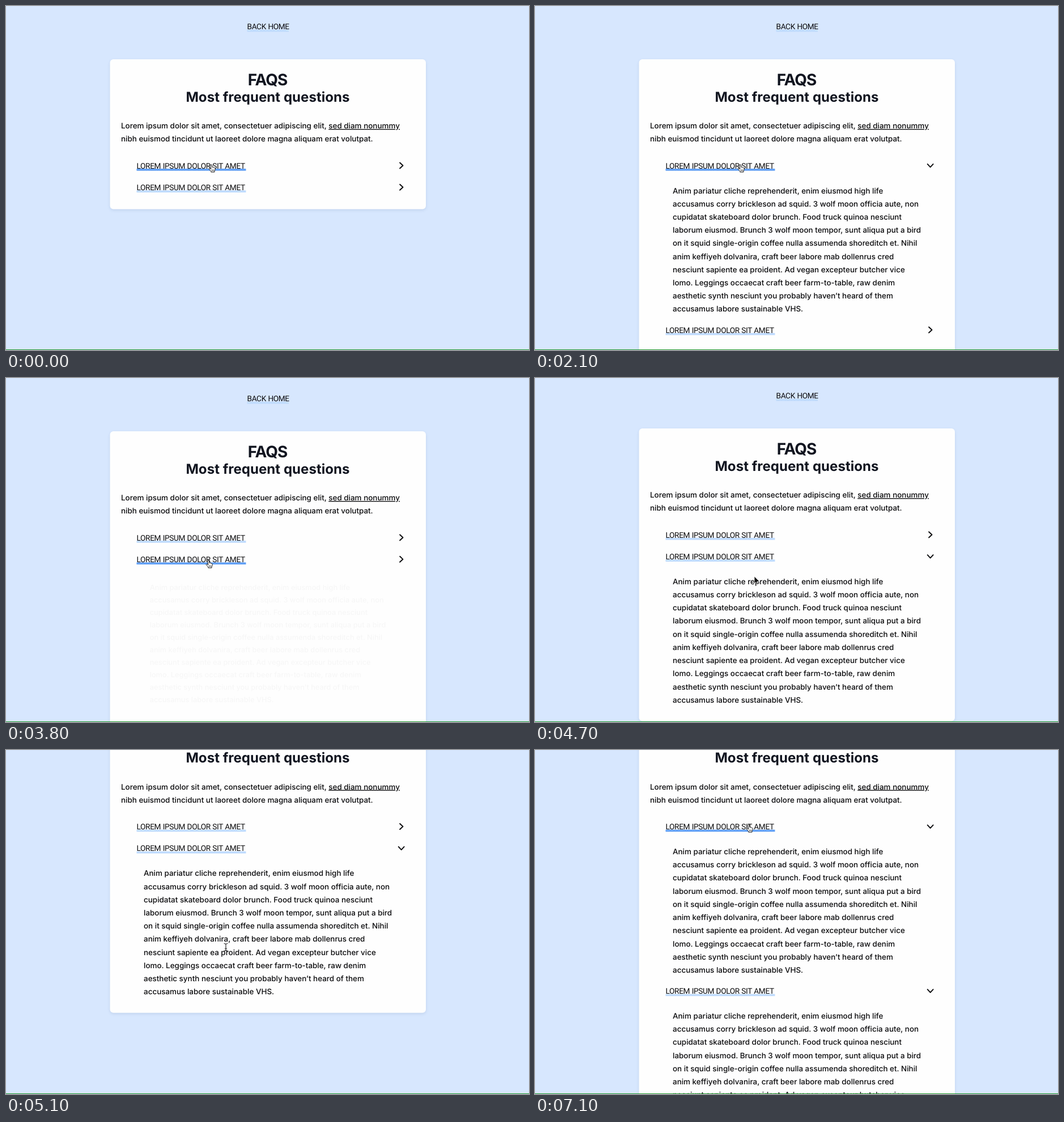
Animation, 923 px wide and 607 px high, one loop 7420 ms. Source, as an HTML page:

```html
<!DOCTYPE html>
<html lang="en">
<head>
<meta charset="utf-8">
<title>FAQs</title>
<style>
  html, body { margin: 0; width: 100%; height: 100%; overflow: hidden; background: #d7e7fe; }
  svg { display: block; width: 923px; height: 607px; }
  text { font-family: Inter, "Open Sans", sans-serif; text-rendering: geometricPrecision; white-space: pre; }
  .body { font-size: 13.45px; font-weight: 500; fill: #0b0b0d; }
  .link { font-family: Roboto, Arial, sans-serif; font-size: 13.7px; letter-spacing: -.38px; word-spacing: .5px; fill: #0b0b0d; }
  .title { font-weight: 700; fill: #111520; text-anchor: middle; }
  .card { fill: #fefefe; filter: drop-shadow(0 2px 2.5px rgba(40, 70, 120, .12)); }
  .chevron { fill: none; stroke: #0b0b0d; stroke-width: 1.9; stroke-linecap: round; stroke-linejoin: round; }
  .cursor { stroke-linejoin: round; stroke-linecap: round; }
</style>
</head>
<body>
<svg viewBox="0 0 923 607">
  <g id="page">
    <rect x="425.5" y="42" width="73.5" height="3.5" fill="#bfdbfe"/>
    <text class="link" x="425.5" y="41.4">BACK HOME</text>
    <rect id="card" class="card" x="183.5" y="94" width="557.5" rx="6"/>
    <text class="title" x="461.5" y="140.2" font-size="28" letter-spacing="-1">FAQS</text>
    <text class="title" x="462" y="168.5" font-size="24.1">Most frequent questions</text>
    <text class="body" x="203" y="216">Lorem ipsum dolor sit amet, consectetuer adipiscing elit, <tspan text-decoration="underline">sed diam nonummy</tspan></text>
    <text class="body" x="203" y="239.2">nibh euismod tincidunt ut laoreet dolore magna aliquam erat volutpat.</text>
  </g>
  <rect y="606" width="923" height="1" fill="#219a2e"/>
  <g id="hand" class="cursor" fill="#fff" stroke="#111" stroke-width="1">
    <path d="M-2 0C-2-1.7 .3-1.7 .5 0L1 3.6C1.6 2.7 2.8 3 3 4C3.6 3.3 4.7 3.7 4.8 4.6C5.6 4.2 6.3 4.8 6.2 5.7C6.3 8 5.8 9 5 10.2V12H-1.2V10.6C-2.4 9.2-3.4 7.9-4.7 6.5C-5.2 5.3-3.7 4.6-2.7 5.7L-1.5 6.6Z"/>
    <path d="M.5 8v2M2.2 8v2M3.9 8v2" stroke-width=".7"/>
  </g>
  <path id="arrow" class="cursor" d="M0 0V13L3 10.2L5 14.6L7 13.7L5.1 9.4H9.2Z" fill="#111" stroke="#fff" stroke-width=".9"/>
  <path id="beam" class="cursor" d="M-3-6.5Q0-6.5 0-4.5Q0-6.5 3-6.5M0-4.5V4.5M-3 6.5Q0 6.5 0 4.5Q0 6.5 3 6.5M-1.5 2.3H1.5" fill="none" stroke="#222" stroke-width="1.1"/>
</svg>
<script>
const LOOP = 7420, STEP = 100, LAST = 7100;
const ROW = 38.3, PANEL = 251.7, FIRST = 281.5;
const lines = [
  "Anim pariatur cliche reprehenderit, enim eiusmod high life",
  "accusamus corry brickleson ad squid. 3 wolf moon officia aute, non",
  "cupidatat skateboard dolor brunch. Food truck quinoa nesciunt",
  "laborum eiusmod. Brunch 3 wolf moon tempor, sunt aliqua put a bird",
  "on it squid single-origin coffee nulla assumenda shoreditch et. Nihil",
  "anim keffiyeh dolvanira, craft beer labore mab dollenrus cred",
  "nesciunt sapiente ea proident. Ad vegan excepteur butcher vice",
  "lomo. Leggings occaecat craft beer farm-to-table, raw denim",
  "aesthetic synth nesciunt you probably haven\u2019t heard of them",
  "accusamus labore sustainable VHS."
];

// Clicks per question: [time, opens]
const clicks = [
  [[1192, true], [2595, false], [6092, true]],
  [[3799, true]]
];
const scrollKeys = [[4600, 0], [4700, 5], [4800, 48], [4900, 100], [5000, 135], [5100, 146.5]];
const pointerKeys = [
  [3100, 363, 281], [3450, 358, 323],
  [4500, 358, 323], [4690, 387, 350],
  [4900, 387, 350], [5000, 388, 348],
  [5350, 388, 348], [5880, 378, 133]
];

const $ = id => document.getElementById(id);
const clamp = x => Math.min(1, Math.max(0, x));
const smooth = x => x * x * (3 - 2 * x);
const easeOut = (x, power) => 1 - (1 - clamp(x)) ** power;

function add(parent, tag, attrs, text) {
  const el = document.createElementNS("http://www.w3.org/2000/svg", tag);
  for (const key in attrs) el.setAttribute(key, attrs[key]);
  if (text) el.textContent = text;
  parent.appendChild(el);
  return el;
}

// Values of a key table at time t
function at(keys, t, ease = x => x) {
  const next = keys.findIndex(k => k[0] > t);
  if (next === 0) return keys[0].slice(1);
  if (next < 0) return keys[keys.length - 1].slice(1);
  const a = keys[next - 1], b = keys[next];
  const p = ease((t - a[0]) / (b[0] - a[0]));
  return a.slice(1).map((v, i) => v + (b[i + 1] - v) * p);
}

function makeQuestion() {
  const root = add($("page"), "g", {});
  const bar = add(root, "rect", { x: 230.5, y: 5.6, width: 193, height: 3.6 });
  add(root, "text", { class: "link", x: 230.5, y: 5 }, "LOREM IPSUM DOLOR SIT AMET");
  const chevron = add(root, "path", { class: "chevron", d: "M-2.6-5L2.8 0L-2.6 5" });
  const panel = add(root, "g", {});
  lines.forEach((line, i) =>
    add(panel, "text", { class: "body", x: 243, y: 49 + i * 23.22 }, line));
  return { root, bar, chevron, panel };
}
const questions = clicks.map(makeQuestion);

function stateOf(list, t) {
  const last = list.filter(c => c[0] <= t).pop();
  if (!last) return { shown: 0, turn: 0, space: 0 };
  const age = t - last[0], turn = easeOut(age / 400, 2);
  return last[1]
    ? { shown: easeOut(age / 100, 2.6), turn, space: PANEL }
    : { shown: 1 - clamp(age / 75), turn: 1 - turn, space: age < 75 ? PANEL : 0 };
}

function draw(t) {
  const [scroll] = at(scrollKeys, t);
  const [px, py] = at(pointerKeys, t, smooth);
  let y = FIRST, kind = "arrow";

  questions.forEach((q, i) => {
    const s = stateOf(clicks[i], t);
    const dy = py - (y - scroll);
    const hover = Math.abs(dy) < 11;
    const scale = .95 + .05 * s.shown;
    if (hover) kind = "hand";
    else if (t > 4850 && s.space && dy > 36 && dy < 262) kind = "beam";
    q.root.setAttribute("transform", `translate(0 ${y})`);
    q.bar.setAttribute("fill", hover ? "#609ff5" : "#bfdbfe");
    q.chevron.setAttribute("transform", `translate(697.7 0) rotate(${90 * s.turn})`);
    q.panel.setAttribute("opacity", s.shown);
    q.panel.setAttribute("transform",
      `translate(462 148.5) scale(${scale}) translate(-462 -148.5)`);
    y += ROW + s.space;
  });

  $("card").setAttribute("height", y + .4 - 94);
  $("page").setAttribute("transform", `translate(0 ${-scroll})`);
  for (const id of ["hand", "arrow", "beam"]) {
    $(id).setAttribute("visibility", id === kind ? "visible" : "hidden");
    $(id).setAttribute("transform", `translate(${px} ${py})`);
  }
}

const start = performance.now();
function tick() {
  const t = (performance.now() - start) % LOOP;
  draw(Math.min(LAST, Math.floor(t / STEP) * STEP));
  requestAnimationFrame(tick);
}
tick();
</script>
</body>
</html>
```
